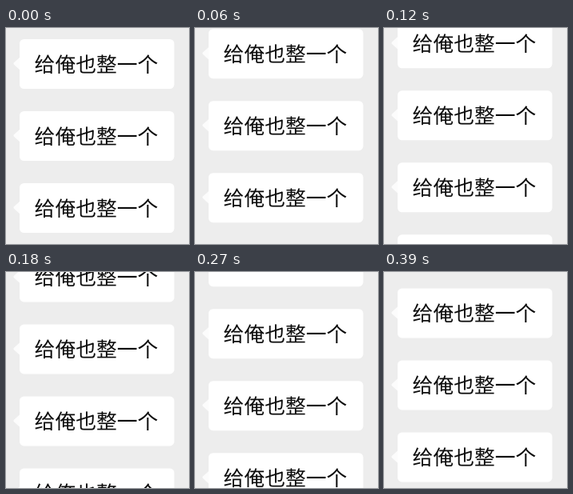
Animation, 229 px wide and 270 px high, one loop 420 ms. Source, as an HTML page:

```html
<!DOCTYPE html>
<html lang="zh-CN">
<head>
<meta charset="utf-8">
<style>
  html, body { margin: 0; width: 100%; height: 100%; overflow: hidden; background: #ededed; }
  svg { display: block; width: 229px; height: 270px; }
  text { font: 25.8px "Noto Sans CJK SC", "Noto Sans CJK", sans-serif; fill: #0c0c0c; text-rendering: geometricPrecision; }
</style>
</head>
<body>
<svg viewBox="0 0 229 270">
  <defs>
    <g id="bubble">
      <path d="M18 22 L10 29.2 Q8.8 30.5 10 31.8 L18 39 Z" fill="#fcfcfc"/>
      <rect x="17" width="193.5" height="62" rx="5.5" fill="#fff"/>
      <text x="35.6" y="40.7">给俺也整一个</text>
    </g>
  </defs>
  <rect width="229" height="270" fill="#ededed"/>
  <g id="list"></g>
</svg>
<script>
  const LOOP = 420, STEP = 30, PITCH = 90, TOP = 14;
  const list = document.getElementById('list');

  for (let i = 0; i < 4; i++) {
    const use = document.createElementNS('http://www.w3.org/2000/svg', 'use');
    use.setAttribute('href', '#bubble');
    use.setAttribute('y', i * PITCH);
    list.append(use);
  }

  // The list climbs by one bubble pitch per loop, in 30 ms steps.
  function draw(ms) {
    const t = Math.floor((ms % LOOP) / STEP) * STEP;
    const y = TOP - PITCH * t / LOOP;
    list.setAttribute('transform', `translate(0 ${y.toFixed(2)})`);
  }

  const start = performance.now();
  function tick() {
    draw(performance.now() - start);
    requestAnimationFrame(tick);
  }
  tick();
</script>
</body>
</html>
```
